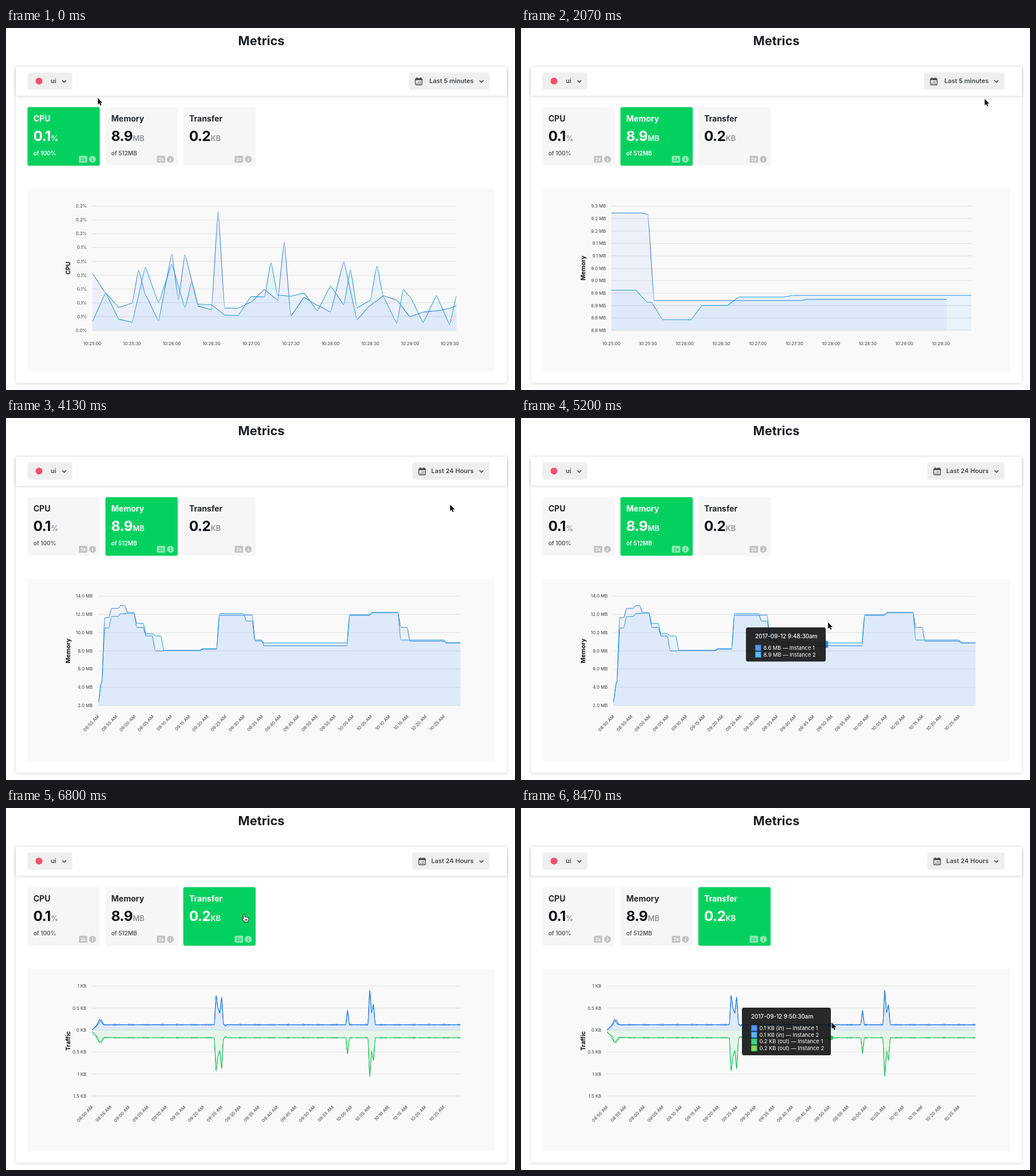
An HTML page with a canvas that plays this animation: 887 by 631 pixels, repeating every 9070 ms.

```html
<!DOCTYPE html>
<html lang="en">
<head>
<meta charset="utf-8">
<title>Metrics</title>
<style>
  html, body { margin: 0; width: 100%; height: 100%; overflow: hidden; background: #fff; }
  canvas { display: block; width: 887px; height: 631px; }
</style>
</head>
<body>
<canvas id="stage"></canvas>
<script>
const W = 887, H = 631, LOOP = 9070, STEP = 1000 / 15;
const canvas = document.getElementById('stage');
const ctx = canvas.getContext('2d');
const dpr = window.devicePixelRatio || 1;
canvas.width = W * dpr;
canvas.height = H * dpr;

const GREEN = '#03d15f', INK = '#1b1f23';
const BLUE_A = '#2a7edb', BLUE_B = '#1c98dc';
const FILL_A = 'rgba(100,130,255,.07)', FILL_B = 'rgba(0,150,255,.065)';

// ---------- helpers ----------
function box(x, y, w, h, r, color) {
  ctx.fillStyle = color;
  ctx.beginPath();
  ctx.roundRect(x, y, w, h, r);
  ctx.fill();
}

function text(str, x, y, size, weight, color, align = 'left', spacing = 0) {
  ctx.font = `${weight} ${size}px Inter, "Open Sans", sans-serif`;
  ctx.letterSpacing = spacing + 'px';
  ctx.textAlign = align;
  ctx.textBaseline = 'alphabetic';
  ctx.fillStyle = color;
  ctx.fillText(str, x, y);
}

function turned(str, x, y, angle, size, weight, color, align) {
  ctx.save();
  ctx.translate(x, y);
  ctx.rotate(angle);
  text(str, 0, size * 0.36, size, weight, color, align);
  ctx.restore();
}

function dot(x, y, r, color) {
  ctx.fillStyle = color;
  ctx.beginPath();
  ctx.arc(x, y, r, 0, Math.PI * 2);
  ctx.fill();
}

function shadow(color, blur, dy) {
  ctx.shadowColor = color;
  ctx.shadowBlur = blur * dpr;
  ctx.shadowOffsetY = dy * dpr;
}

const inside = (p, x, y, w, h) => p.x >= x && p.x < x + w && p.y >= y && p.y < y + h;
const pad = n => String(n).padStart(2, '0');
const clamp = f => Math.min(1, Math.max(0, f));
const mix = (a, b, f) => a + (b - a) * f;

function seeded(seed) {
  return () => {
    seed = (seed * 16807) % 2147483647;
    return seed / 2147483647;
  };
}

// ---------- series: lists of {x, y} ----------
function heightAt(points, x) {
  const i = Math.max(1, points.findIndex(p => p.x >= x));
  const a = points[i - 1], b = points[i];
  return mix(a.y, b.y, clamp((x - a.x) / (b.x - a.x)));
}

// restless low line with chosen heights at some samples
function spiky(seed, keys) {
  const random = seeded(seed), points = [];
  for (let k = 0; k <= 55; k++) {
    if (k % 2 && !(k in keys)) continue;
    points.push({ x: 150.5 + k * 11.53, y: keys[k] ?? 462 + random() * 56 });
  }
  return points;
}

// plateaus joined by short ramps
function stepped(x, y, end, ramp, steps) {
  const points = [{ x, y }];
  for (const [at, level] of steps) {
    points.push({ x: at, y }, { x: at + ramp, y: level });
    y = level;
  }
  points.push({ x: end, y });
  return points;
}

// traffic around a level; dir is -1 for incoming, 1 for outgoing
const TX = 150, TSTEP = 642 / 199;
const bursts = { 67: 51, 68: 29, 69: 20, 70: 48, 71: 1, 72: -1.5, 138: 25, 150: 60, 151: 21, 152: 35 };
function flow(level, dir, phase, lag) {
  const points = [], gain = dir > 0 ? 1.13 : 1;
  for (let i = 0; i < 200; i++) {
    const warmUp = 9 * Math.exp(-i / 2.5);
    const bump = 10 * Math.exp(-(((i - 4 - lag) / 1.3) ** 2));
    const jitter = Math.sin(i * 2.4 + phase) * Math.sin(i * 0.37) ** 2;
    const size = gain * ((bursts[i] || 0) + bump - warmUp);
    points.push({ x: TX + i * TSTEP, y: level + dir * size + jitter });
  }
  return points;
}

const cpuA = spiky(11, { 0: 428, 7: 422, 12: 394, 13: 473, 14: 395, 19: 320, 26: 456, 29: 373, 38: 407, 55: 484 });
const cpuB = spiky(29, { 0: 511, 8: 417, 12: 412, 15: 443, 27: 409, 36: 450, 39: 421, 43: 415, 47: 456, 55: 468 });

const memA = stepped(157.5, 322.5, 742, 11, [[210, 325], [221, 475], [487, 473]]);
const memB = stepped(157.5, 457, 785, 20,
  [[200, 478], [227, 508.5], [296, 483.5], [360, 469], [456, 466]]);

// start of ramp, level of each instance
const dayPlan = [
  [161, 461, 462], [167, 348, 366], [179, 332, 346], [195, 327, 341], [207, 339.5, 340],
  [223, 365, 358], [239, 380, 376], [255, 406, 380], [270, 405.5, 405], [338, 403, 402],
  [367, 344, 341], [414, 343.5, 354], [429, 387, 389], [445, 397, 392], [594, 344, 343],
  [633, 339, 339], [683, 365, 387], [699, 389, 387], [763, 392, 392]
];
const dayLine = n => stepped(161, 496, 792, 5, dayPlan.map(row => [row[0], row[n]]));

const seconds = i => `10:${25 + (i >> 1)}:${i % 2 ? '30' : '00'}`;
const clock = i => {
  const m = 530 + i * 5;
  return `${pad(Math.floor(m / 60))}:${pad(m % 60)} AM`;
};
const scale = (n, label) => Array.from({ length: n }, (_, i) => label(i));

const charts = {
  cpu: {
    title: 'CPU', titleY: 418.5, left: 150, right: 785, bottom: 527, base: 527, labelX: 141,
    yLabels: scale(10, i => (0.2 - i * 0.0177).toFixed(1) + '%'),
    x0: 150.5, dx: 69.2, ticks: 10, tick: seconds,
    lines: [[cpuA, BLUE_A, FILL_A], [cpuB, BLUE_B, FILL_B]]
  },
  memory: {
    title: 'Memory', titleY: 418.5, left: 157, right: 785, bottom: 527, base: 527, labelX: 148,
    yLabels: scale(11, i => (9.26 - i * 0.051).toFixed(1) + ' MB'),
    x0: 157.5, dx: 63.8, ticks: 10, tick: seconds,
    lines: [[memA, BLUE_A, FILL_A], [memB, BLUE_B, FILL_B]]
  },
  day: {
    title: 'Memory', titleY: 406, left: 161, right: 792, bottom: 501, base: 501, labelX: 151,
    yLabels: scale(7, i => (14 - i * 2).toFixed(1) + ' MB'),
    x0: 161, dx: 31.7, ticks: 20, tick: clock, slanted: true, tipWidth: 139,
    lines: [[dayLine(1), BLUE_A, FILL_A], [dayLine(2), BLUE_B, FILL_B]],
    row: (y, i) => `${(14 - (y - 310.5) / 15.875).toFixed(1)} MB — Instance ${i + 1}`
  },
  traffic: {
    title: 'Traffic', titleY: 406, left: 150, right: 792, bottom: 502, base: 387, labelX: 140,
    yLabels: scale(6, i => Math.abs(1 - i / 2) + ' KB'),
    x0: TX, dx: TSTEP * 10, ticks: 20, tick: clock, slanted: true, tipWidth: 155,
    lines: [
      [flow(377.5, -1, 1.2, 0), '#1d72e6', FILL_A], [flow(377.9, -1, 4.5, 0.6), '#1f7de8', FILL_B],
      [flow(400.3, 1, 1.2, 0), '#1dbf5f', 'rgba(0,200,80,.045)'],
      [flow(400.7, 1, 4.5, 0.6), '#25c75f', 'rgba(60,210,60,.045)']
    ],
    row: (y, i) => `${(Math.abs(y - 387) / 76.6).toFixed(1)} KB (${i < 2 ? 'in' : 'out'}) — Instance ${i % 2 + 1}`
  }
};

const SWATCHES = ['#5b92ea', '#5ab8f2', '#45ce85', '#82d955'];

// ---------- timeline ----------
const scenes = [
  { at: 0, chart: 'cpu', card: 0, grow: 0 },
  { at: 860, chart: 'memory', card: 1, grow: 340 },
  { at: 3795, chart: 'day', card: 1, grow: 340 },
  { at: 6395, chart: 'traffic', card: 2, grow: 470 }
];
const MENU_OPEN = 2595, MENU_CLOSE = 3795;

// pointer moves: start, end, target x, target y
const moves = [
  [330, 800, 213, 166], [1200, 2130, 816, 123], [2130, 2530, 823, 88], [2600, 3000, 780, 142],
  [3000, 3530, 774, 151], [4470, 5000, 590, 360], [5000, 5400, 480, 352], [5400, 6200, 415, 185],
  [7200, 7330, 432, 185], [7400, 8000, 385.5, 338], [8000, 8460, 541.6, 374]
];

function pointerAt(t) {
  const p = { x: 160, y: 122 };
  for (const [from, to, x, y] of moves) {
    const f = clamp((t - from) / (to - from));
    const e = f * f * (3 - 2 * f);
    p.x = mix(p.x, x, e);
    p.y = mix(p.y, y, e);
  }
  return p;
}

// ---------- page parts ----------
function chevron(x, y) {
  ctx.strokeStyle = '#44494d';
  ctx.lineWidth = 1.6;
  ctx.beginPath();
  ctx.moveTo(x - 3.4, y - 1.6);
  ctx.lineTo(x, y + 1.8);
  ctx.lineTo(x + 3.4, y - 1.6);
  ctx.stroke();
}

function calendar(x, y) {
  const c = '#4a4e52';
  ctx.strokeStyle = c;
  ctx.lineWidth = 1.4;
  ctx.beginPath();
  ctx.roundRect(x + 0.7, y + 2, 11.6, 11, 1.5);
  ctx.stroke();
  box(x + 0.5, y + 2, 12, 3, 1, c);
  box(x + 2.6, y, 1.6, 3, 0.5, c);
  box(x + 8.8, y, 1.6, 3, 0.5, c);
  for (let n = 1; n < 6; n++) {
    box(x + 2.9 + (n % 3) * 2.8, y + 7 + Math.floor(n / 3) * 2.8, 1.5, 1.5, 0, c);
  }
}

function frame(range) {
  text('Metrics', 445, 30, 21.7, 700, INK, 'center');
  ctx.save();
  shadow('rgba(0,0,0,.17)', 5, 1);
  box(17, 67.5, 856, 551, 3, '#fff');
  box(17, 67.5, 856, 50.5, 2, '#fff');
  ctx.restore();

  box(37.5, 77.5, 78, 30, 3, '#efefef');
  dot(57.5, 92.5, 6, '#f5506a');
  text('ui', 78, 96, 11, 600, '#44494d');
  chevron(101.5, 93);

  const left = range === 'Last 5 minutes' ? 702 : 708;
  box(left, 77.5, 842.5 - left, 30, 3, '#efefef');
  calendar(left + 10.7, 86);
  text(range, 815, 96, 11, 600, '#44494d', 'right');
  chevron(828.5, 93);
}

const cards = [
  { x: 37.5, name: 'CPU', value: '0.1', unit: '%', limit: 'of 100%' },
  { x: 173.3, name: 'Memory', value: '8.9', unit: 'MB', limit: 'of 512MB' },
  { x: 309, name: 'Transfer', value: '0.2', unit: 'KB', limit: '' }
];
const overCard = (p, c) => inside(p, c.x, 138, 126, 102);

function drawCard(c, active, hover) {
  const back = active ? GREEN : hover ? '#e1e1e1' : '#f6f6f6';
  const badge = active ? '#8ceab4' : hover ? '#b0b0b0' : '#c3c2c4';
  const mark = active ? GREEN : '#fff';
  box(c.x, 138, 126, 102, 3, back);
  text(c.name, c.x + 10.2, 163, 14, 700, active ? '#fff' : '#24282c');
  text(c.value, c.x + 10, 197.3, 24.5, 700, active ? '#fff' : '#0d1117', 'left', -0.7);
  const w = ctx.measureText(c.value).width;
  text(c.unit, c.x + 10.5 + w, 197.3, 12.8, 600, active ? '#fff' : '#8e9296');
  text(c.limit, c.x + 10.2, 221.7, 10, 600, active ? '#fff' : '#55595d');
  box(c.x + 89.6, 222.8, 14.5, 12, 1.5, badge);
  text('2x', c.x + 96.9, 231.6, 7.5, 700, mark, 'center');
  dot(c.x + 113.2, 228.8, 6.1, badge);
  box(c.x + 112.5, 225.4, 1.5, 1.5, 0.7, mark);
  box(c.x + 112.5, 227.9, 1.5, 4.3, 0.3, mark);
}

function trace(points, base, grow) {
  const y = p => mix(base, p.y, grow);
  ctx.moveTo(points[0].x, y(points[0]));
  for (let i = 1; i < points.length; i++) {
    const a = points[i - 1], b = points[i];
    const bend = Math.min(1.5, (b.x - a.x) / 5);
    ctx.bezierCurveTo(a.x + bend, y(a), b.x - bend, y(b), b.x, y(b));
  }
}

function drawChart(c, grow) {
  box(37.5, 280, 815, 318.5, 3, '#f9f9f9');
  const rows = c.yLabels.length - 1;
  c.yLabels.forEach((label, i) => {
    const y = mix(310.5, c.bottom, i / rows);
    box(c.left, y - 0.6, c.right - c.left, 1.3, 0, '#e5e5e5');
    text(label, c.labelX, y + 2.8, 7.7, 500, '#55585b', 'right');
  });
  for (let i = 0; i < c.ticks; i++) {
    const x = c.x0 + i * c.dx;
    if (c.slanted) turned(c.tick(i), x, c.bottom + 18, -0.8, 7.7, 500, '#55585b', 'right');
    else text(c.tick(i), x, 553.2, 7.5, 500, '#55585b', 'center');
  }
  turned(c.title, 107.7, c.titleY, -Math.PI / 2, 10.6, 700, '#111', 'center');

  for (const [points, , fill] of c.lines) {
    ctx.fillStyle = fill;
    ctx.beginPath();
    trace(points, c.base, grow);
    ctx.lineTo(points[points.length - 1].x, c.base);
    ctx.lineTo(points[0].x, c.base);
    ctx.fill();
  }
  ctx.lineWidth = 1.05;
  ctx.lineJoin = 'round';
  for (const [points, color] of c.lines) {
    ctx.strokeStyle = color;
    ctx.beginPath();
    trace(points, c.base, grow);
    ctx.stroke();
  }
}

function drawTip(c, p) {
  if (!c.row || !inside(p, c.left, 310, c.right - c.left, c.bottom - 310)) return;
  const step = c.dx / 10;
  const index = Math.floor((p.x - c.x0) / step);
  const x = c.x0 + index * step;
  const ys = c.lines.map(line => heightAt(line[0], x));
  ys.forEach((y, i) => dot(x, y, 3.8, c.lines[i][1]));

  const h = 36 + ys.length * 11.75;
  const mid = ys.reduce((a, b) => a + b) / ys.length;
  const left = Math.round(x < (c.left + c.right) / 2 ? x + 3 : x - 0.6 - c.tipWidth);
  const top = Math.round(mid - h / 2 + 0.4);
  box(left, top, c.tipWidth, h, 3.5, 'rgba(18,18,18,.9)');

  const sec = 530 * 60 + index * 30;
  const time = `${Math.floor(sec / 3600)}:${pad(Math.floor(sec / 60) % 60)}:${pad(sec % 60)}am`;
  text('2017-09-12 ' + time, left + 16, top + 18.6, 9.9, 500, '#fff');
  ys.forEach((y, i) => {
    const cy = top + 35.5 + i * 11.75;
    box(left + 16, cy - 5.2, 10.6, 10.6, 0, c.lines[i][1]);
    box(left + 17, cy - 4.2, 8.6, 8.6, 0, SWATCHES[i]);
    text(c.row(y, i), left + 30.5, cy + 3.4, 9.3, 400, '#fff');
  });
}

function drawMenu(p) {
  ctx.save();
  shadow('rgba(0,0,0,.25)', 4, 1);
  box(702, 112.5, 118, 91, 3, '#212529');
  ctx.restore();
  ['Last 5 minutes', 'Last 24 Hours', 'Last 30 days'].forEach((label, i) => {
    const y = 112.5 + i * 30.3;
    if (inside(p, 702, y, 118, 30.3)) box(702, y, 118, 30.3, i ? 0 : [3, 3, 0, 0], '#33373b');
    text(label, 712.7, y + 18.7, 10.4, 600, '#fff');
  });
}

const HAND = new Path2D('M-1.6 8.2V1.2Q-1.6 0 -.3 0T1 1.2V5.2Q2.2 4.3 3.3 5.5Q4.6 4.7 5.6 5.9Q8 5.4 8 7.6V9.2' +
  'Q8 11 6.8 12.2V13.8H.2V12.6Q-2 10.6 -3.9 7.8Q-4.6 6.5 -3.4 6.3Q-2.5 6.3 -1.6 8.2Z');
const FINGERS = new Path2D('M1.6 8.6V11.4M3.4 8.6V11.4M5.2 8.6V11.4');
const ARROW = new Path2D('M0 0V11.2L2.5 8.9L4.3 13L6.3 12.1L4.5 8.2H7.9Z');

function drawPointer(p, hand) {
  ctx.save();
  ctx.translate(p.x, p.y);
  ctx.lineJoin = 'round';
  if (hand) {
    ctx.fillStyle = '#fff';
    ctx.fill(HAND);
    ctx.strokeStyle = '#111';
    ctx.lineWidth = 1;
    ctx.stroke(HAND);
    ctx.stroke(FINGERS);
  } else {
    ctx.strokeStyle = '#fff';
    ctx.lineWidth = 1.6;
    ctx.stroke(ARROW);
    ctx.fillStyle = '#111';
    ctx.fill(ARROW);
  }
  ctx.restore();
}

// ---------- loop ----------
function render(t) {
  const scene = scenes.filter(s => s.at <= t).pop();
  const f = scene.grow ? clamp((t - scene.at) / scene.grow) : 1;
  const p = pointerAt(t);
  const menu = t >= MENU_OPEN && t < MENU_CLOSE;
  const hand = cards.some(c => overCard(p, c)) || inside(p, 702, 77, 140, 30)
    || (menu && inside(p, 702, 112, 118, 91));

  ctx.setTransform(dpr, 0, 0, dpr, 0, 0);
  ctx.fillStyle = '#fff';
  ctx.fillRect(0, 0, W, H);
  frame(t < MENU_CLOSE ? 'Last 5 minutes' : 'Last 24 Hours');
  cards.forEach((c, i) => drawCard(c, i === scene.card, overCard(p, c)));
  drawChart(charts[scene.chart], 1 - (1 - f) ** 4);
  drawTip(charts[scene.chart], p);
  if (menu) drawMenu(p);
  drawPointer(p, hand);
}

const start = performance.now();
function tick() {
  const t = (performance.now() - start) % LOOP;
  render(Math.floor((t + 5) / STEP) * STEP);
  requestAnimationFrame(tick);
}
tick();
</script>
</body>
</html>
```
